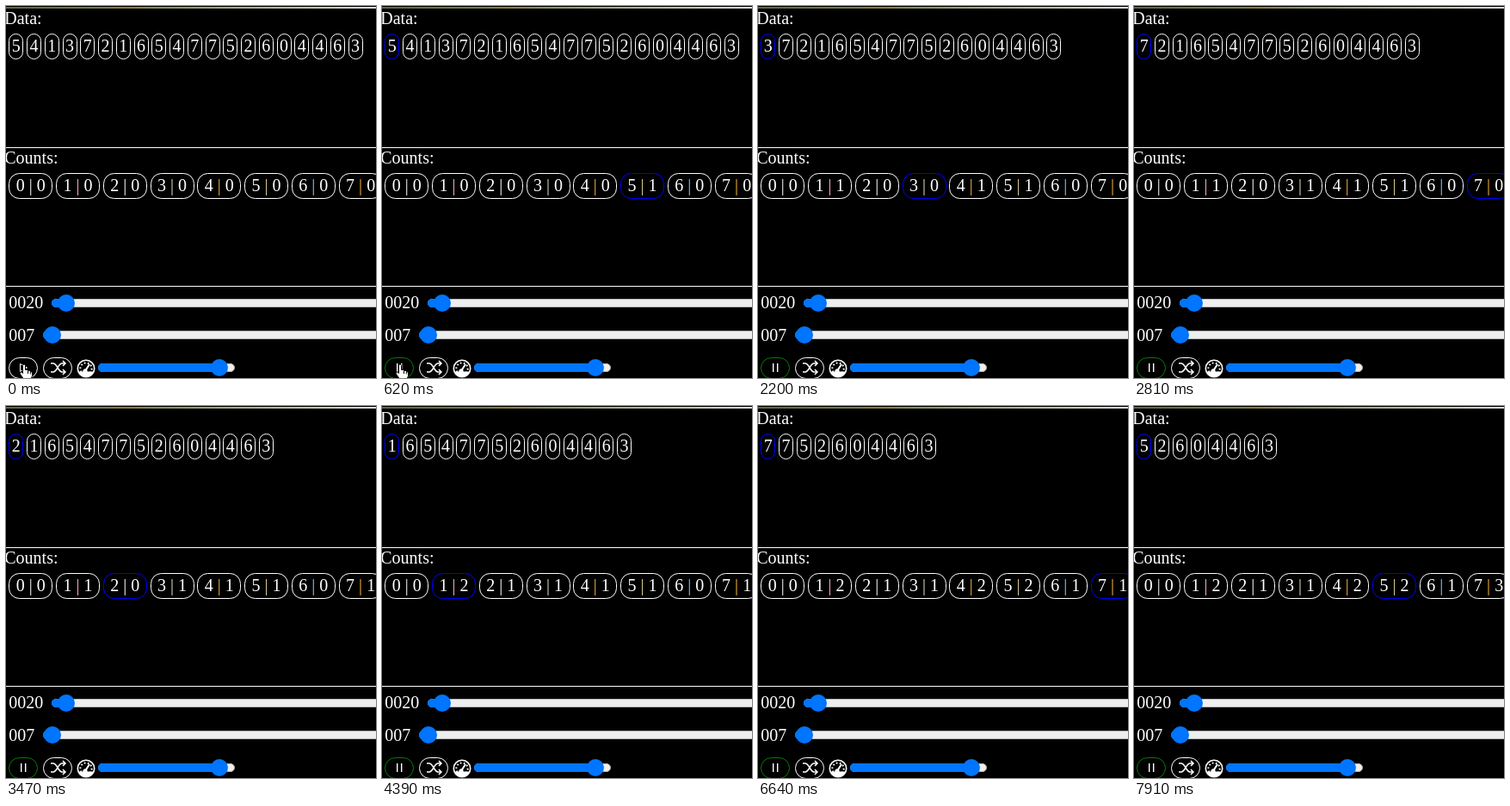
Write an HTML page that moves like this. It is 430 px wide and 432 px high and loops after 8000 ms.

```html
<!DOCTYPE html>
<html lang="en">
<head>
<meta charset="utf-8">
<title>Counting sort</title>
<style>
  html, body { margin: 0; width: 100%; height: 100%; overflow: hidden; background: #000; }
  #stage {
    position: relative; width: 430px; height: 432px; overflow: hidden;
    color: #fff; font: 20px/23px "Liberation Serif", "Times New Roman", serif;
  }
  #stage > * { position: absolute; }
  .label { left: -1.75px; }
  .row { left: 3.25px; display: flex; gap: 3.75px; }
  .pill {
    box-sizing: border-box; flex: none; height: 30px; padding: 2px 2.5px;
    border: 1px solid #fff; border-radius: 12.5px; white-space: pre;
  }
  #counts .pill { padding: 2px 7.5px; }
  .row .active { border-color: #00f; }
  hr { left: 0; width: 430px; height: 1px; margin: 0; border: 0; background: #fff; }
  #edge { top: 1px; height: 2px; background: linear-gradient(90deg, #66644a, #85833f 33%, #aaa98a 60%, #ddd); }
  svg { left: 0; top: 0; }
</style>
</head>
<body>
<div id="stage">
  <hr id="edge">
  <div class="label" style="top:3px">Data:</div>
  <div class="row" id="data" style="top:32px"></div>
  <hr style="top:164px">
  <div class="label" style="top:165px">Counts:</div>
  <div class="row" id="counts" style="top:194px"></div>
  <hr style="top:325px">
  <svg width="430" height="432" fill="none" stroke="#fff">
    <g fill="#fff" stroke="none">
      <text x="3.25" y="351">0020</text>
      <text x="3.25" y="389">007</text>
    </g>
    <g id="sliders" stroke="none"></g>

    <rect id="button" x="3.5" y="408.5" width="33" height="24" rx="12"/>
    <path id="play" d="M16.5 415.5v9l8-4.5z"/>
    <path id="pause" d="M17.7 415v10M22.7 415v10" stroke-width="1.4"/>

    <rect x="43.5" y="408.5" width="33" height="24" rx="12"/>
    <path stroke-width="1.5" d="M52 415h3c4 0 6 10 10 10h4M52 425h3c4 0 6-10 10-10h4M66 412l3 3-3 3M66 422l3 3-3 3"/>

    <circle cx="93" cy="421" r="9.7" stroke-width="1.6"/>
    <circle cx="93" cy="421" r="6.6" stroke-width="2" stroke-dasharray="1.6 2.5"/>
    <path d="M84.5 425h17a9.5 9.5 0 0 1-17 0z" fill="#fff"/>
    <path d="M92 424l5-8" stroke-width="2"/>
    <circle cx="92" cy="424" r="2.2" fill="#fff"/>

    <path id="hand" fill="#fff" stroke="#000" stroke-linejoin="round"
      d="M19.5 426v-8.500q0-1.500 1.500-1.500t1.500 1.500v5q2.500-1 3 1 2.300-.8 2.800 1 2.200-.5 2.200 2v3l-2 5h-7l-5-7q-1-2 .5-2.500t2.500 1.500zM25.500 424v3M28.300 425v2.500"/>
  </svg>
</div>
<script>
const LOOP = 8000, PRESS = 70, CURSOR_LEAVES = 780;
const VALUES = [...'54137216547752604463'].map(Number);
const BAR_TINTS = ['#fff', '#f7a8cc', '#fff', '#e8dcc4', '#ffb53c', '#dcc896', '#7fd8ff', '#ffb53c'];
// Alternating moments: pick the next value, then count it.
const STEPS = [
  290, 620, 950, 1280, 1610, 1870, 2200, 2530, 2810, 3140, 3470, 3800, 4130,
  4390, 4720, 5050, 5380, 5710, 5970, 6320, 6640, 6920, 7250, 7580, 7910
];
const $ = id => document.getElementById(id);

const slider = (left, right, knob, y) => `
  <rect x="${left + .5}" y="${y - 4.5}" width="${right - left - 1}" height="9" rx="4.5" fill="#efefef" stroke="#b2b2b2"/>
  <path d="M${knob} ${y - 5}H${left + 5}a5 5 0 0 0 0 10H${knob}z" fill="#0075ff"/>
  <circle cx="${knob}" cy="${y}" r="10" fill="#0075ff"/>`;
$('sliders').innerHTML =
  slider(53, 500, 70, 345) + slider(43, 500, 54, 382) + slider(107, 266, 248, 420);

const pill = (content, active) => `<div class="pill${active ? ' active' : ''}">${content}</div>`;

function drawPills(step) {
  const done = Math.max(0, (step - 1) >> 1);
  const counted = VALUES.slice(0, step >> 1);
  $('data').innerHTML = VALUES.slice(done)
    .map((v, i) => pill(v, step && i === 0)).join('');
  $('counts').innerHTML = BAR_TINTS.map((tint, v) => {
    const count = counted.filter(c => c === v).length;
    return pill(`${v} <span style="color:${tint}">|</span> ${count}`, step && v === VALUES[done]);
  }).join('');
}

const show = (id, visible) => $(id).setAttribute('visibility', visible ? 'visible' : 'hidden');
let shownStep = -1;

function frame() {
  const t = performance.now() % LOOP;
  const step = STEPS.filter(time => time <= t).length;
  if (step !== shownStep) drawPills(shownStep = step);
  const running = t >= PRESS;
  show('play', !running);
  show('pause', running);
  show('hand', t < CURSOR_LEAVES);
  $('button').setAttribute('stroke', running ? 'green' : '#fff');
  requestAnimationFrame(frame);
}
frame();
</script>
</body>
</html>
```
